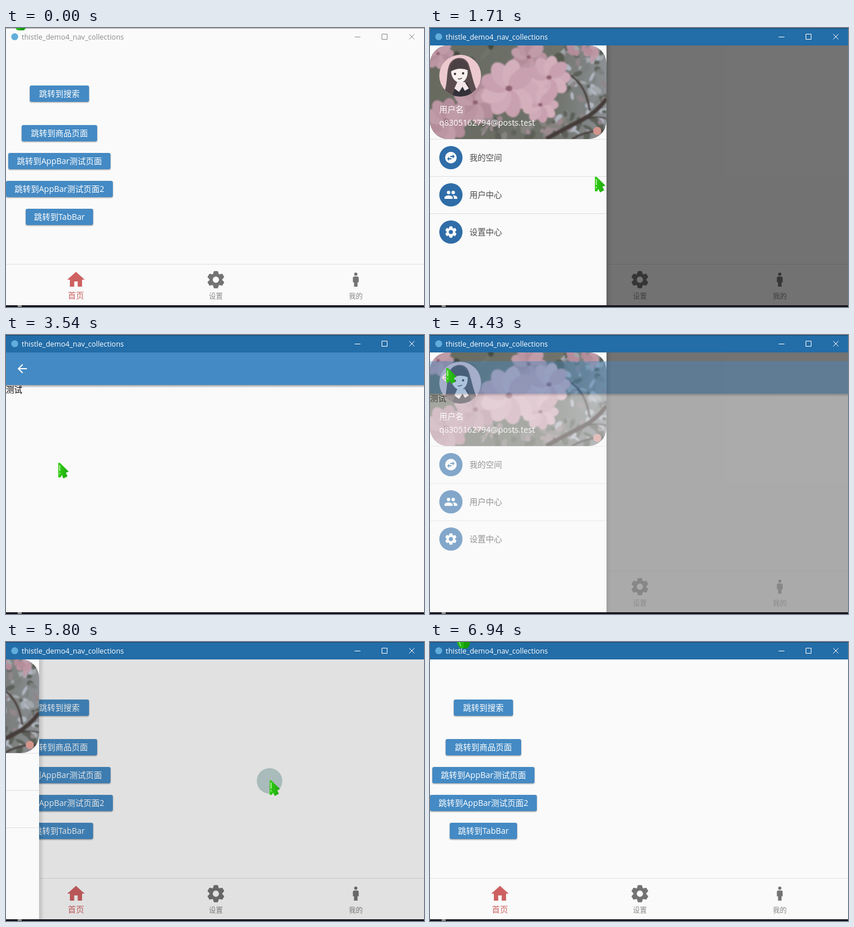
These frames come from a looping animation (720 by 480 pixels, 7110 ms). An HTML page:

```html
<!DOCTYPE html>
<html lang="zh-CN">
<head>
<meta charset="utf-8">
<title>Drawer demo</title>
<style>
  html, body { margin: 0; width: 100%; height: 100%; overflow: hidden; background: #fafafa; }
  svg { display: block; width: 720px; height: 480px; }
  text { font: 14px "Open Sans", "Noto Sans CJK SC", "Noto Sans CJK", sans-serif; }
  .button rect { fill: #448ac4; filter: drop-shadow(0 1.5px 1.2px rgba(0, 0, 0, .4)); }
  .button text { fill: #fff; text-anchor: middle; }
  .nav { fill: #737373; text-anchor: middle; }
  .nav text { font-size: 12px; font-weight: 300; fill: #868686; }
  .nav .active { fill: #cd6161; font-size: 14px; }
  .tile text { fill: #484848; font-weight: 300; }
  .tile circle { fill: #2f6da8; }
  .header text { fill: #fff; }
  .soft { filter: blur(1.2px); }
  #bar { fill: #236da8; }
  #chrome { --ink: #fff; }
  #chrome.idle { --ink: #8c8c8c; }
  #chrome.idle #bar { fill: #fafafa; }
  #chrome text { fill: var(--ink); font-size: 12.5px; }
  #controls { fill: none; stroke: var(--ink); }
</style>
</head>
<body>
<svg viewBox="0 0 720 480">
  <defs>
    <clipPath id="photoClip"><rect y="30" width="304" height="161" rx="31"/></clipPath>
    <clipPath id="avatarClip"><circle cx="52" cy="82" r="36"/></clipPath>
    <linearGradient id="edge"><stop stop-opacity=".15"/><stop offset="1" stop-opacity="0"/></linearGradient>
    <linearGradient id="under" x2="0" y2="1"><stop stop-opacity=".35"/><stop offset="1" stop-opacity="0"/></linearGradient>
    <linearGradient id="sky"><stop stop-color="#686a5f"/><stop offset=".7" stop-color="#6f726b"/><stop offset="1" stop-color="#8c9094"/></linearGradient>
    <linearGradient id="lime"><stop stop-color="#35cf16"/><stop offset="1" stop-color="#1ba60d"/></linearGradient>
    <path id="home" d="M10 20v-6h4v6h5v-8h3L12 3 2 12h3v8z"/>
    <path id="gear" fill-rule="evenodd"/>
    <g id="people">
      <circle cx="8" cy="8" r="3"/><circle cx="16" cy="8" r="3"/>
      <path d="M1 19v-2.5C1 14.2 5.7 13 8 13s7 1.2 7 3.5V19zM15 13c4 0 8 1.2 8 3.5V19h-6v-2.5c0-1.5-.8-2.6-2-3.5z"/>
    </g>
    <path id="swap" fill-rule="evenodd" d="M2 12a10 10 0 1 0 20 0a10 10 0 1 0-20 0M15 6.5l3.5 3.5-3.5 3.5V11h-4V9h4zM9 17.5L5.5 14 9 10.5V13h4v2H9z"/>
  </defs>

  <rect width="720" height="480" fill="#fafafa"/>
  <g id="buttons"></g>
  <path d="M0 406.5H720" stroke="#e2e2e2"/>
  <g class="nav">
    <g class="active"><use href="#home" transform="translate(102.5 415) scale(1.5)"/></g>
    <text class="active" x="120.5" y="465">首页</text>
    <use href="#gear" transform="translate(343.5 415) scale(1.5)"/>
    <text x="361.5" y="466">设置</text>
    <circle cx="602.5" cy="423.5" r="2.8"/>
    <path d="M600 427.5h5q2.5 0 2.5 2.5v7.5h-2v7.5h-6v-7.5h-2v-7.5q0-2.5 2.5-2.5z"/>
    <text x="602.5" y="466">我的</text>
  </g>

  <rect id="scrim" width="720" height="480"/>
  <g id="drawer">
    <rect x="304" y="30" width="9" height="447" fill="url(#edge)"/>
    <rect y="30" width="304" height="447" fill="#fafafa"/>
    <g class="header">
      <g clip-path="url(#photoClip)">
        <rect y="30" width="304" height="161" fill="url(#sky)"/>
        <g id="photo" class="soft"></g>
      </g>
      <circle cx="288" cy="177" r="7" fill="#d3948c"/>
      <g clip-path="url(#avatarClip)">
        <rect x="16" y="46" width="72" height="72" fill="#ecc9cf"/>
        <path d="M22 118C31 98 28 80 32 67C36 49 59 46 66 61C72 76 74 98 86 118z" fill="#5a4c4e"/>
        <path d="M36 70Q49 62 64 68Q68 88 53 95Q36 92 36 70z" fill="#f7eeee"/>
        <path d="M34 76Q35 55 50 54Q66 55 66 73Q50 66 34 76z" fill="#4b4145"/>
        <path d="M48 87q3 2 7-1" stroke="#3a3034" stroke-width="1.2" fill="none"/>
        <circle cx="43" cy="79" r="2" fill="#3a3034"/><circle cx="57" cy="78" r="2" fill="#3a3034"/>
        <path d="M38 118l8-23 9 3 9-4 10 24z" fill="#343038"/>
        <path d="M47 93h13l7 11-7 4-4-7-6 9-8-6z" fill="#f2e6e9"/>
      </g>
      <text x="16" y="145">用户名</text>
      <text x="16" y="168">q8305162794@posts.test</text>
    </g>
    <g id="tiles"></g>
  </g>

  <g id="page">
    <rect y="30" width="720" height="450" fill="#fafafa"/>
    <rect y="86" width="720" height="5" fill="url(#under)"/>
    <rect y="30" width="720" height="56" fill="#448ac4"/>
    <path d="M36 57H23.8l5.6-5.6L28 50l-8 8 8 8 1.4-1.4L23.8 59H36z" fill="#fff"/>
    <text y="99">测试</text>
  </g>

  <g id="chrome">
    <rect id="bar" width="720" height="30"/>
    <path d="M0 .5H720" stroke="#000" stroke-opacity=".35"/>
    <circle cx="15" cy="15" r="6" fill="#62addc"/>
    <text x="27" y="20">thistle_demo4_nav_collections</text>
    <path id="controls" d="M600.5 15.5h10M647.5 10.5h9v9h-9zM694.5 10.5l9 9M703.5 10.5l-9 9"/>
    <rect y="477" width="720" height="3" fill="#15131c"/>
    <rect x="20" y="477" width="7" height="3" fill="#8b8b8b"/>
  </g>

  <circle id="tap"/>
  <g id="cursor">
    <g id="arrow">
      <path d="M0 0H3L18 15 13 17 16 23 9 27 6 21 4 25H0z" fill="url(#lime)"/>
      <path d="M2.5 4v10M2.5 17v2" stroke="#d8f8cc" stroke-width="1.4"/>
    </g>
    <g id="leaf">
      <path d="M22 5C14 8 10 13 8 26H18C24 20 24 12 22 5z" fill="#149c0a"/>
      <path d="M4 0C-2 7-1 21 7 26H11C15 18 11 7 4 0z" fill="#25b414"/>
      <path d="M4 5Q3 14 7 22" stroke="#b6efa2" stroke-width="1.2" fill="none"/>
    </g>
  </g>
</svg>

<script>
const LOOP = 7110;
const $ = id => document.getElementById(id);
const clamp = v => Math.min(1, Math.max(0, v));

function bezier(x1, y1, x2, y2) {
  const at = (a, b, u) => 3 * a * u * (1 - u) ** 2 + 3 * b * u * u * (1 - u) + u ** 3;
  return x => {
    let lo = 0, hi = 1;
    for (let i = 0; i < 24; i++) {
      const mid = (lo + hi) / 2;
      if (at(x1, x2, mid) < x) lo = mid; else hi = mid;
    }
    return at(y1, y2, hi);
  };
}
const easeIn = bezier(.42, 0, 1, 1);
const fastOutSlowIn = bezier(.4, 0, .2, 1);

function gearPath() {
  const point = (deg, r) => {
    const a = deg * Math.PI / 180;
    return `${(12 + r * Math.sin(a)).toFixed(2)} ${(12 - r * Math.cos(a)).toFixed(2)}`;
  };
  const corners = [];
  for (let a = 0; a < 360; a += 60)
    corners.push(point(a - 27, 7.3), point(a - 13, 10.1), point(a + 13, 10.1), point(a + 27, 7.3));
  return `M${corners.join('L')}zM8.4 12a3.6 3.6 0 1 0 7.2 0a3.6 3.6 0 1 0-7.2 0`;
}

function blossomPhoto() {
  let seed = 7;
  const rand = () => (seed = seed * 16807 % 2147483647) / 2147483647;
  const blob = (x, y, rx, ry, fill, turn = 0) =>
    `<ellipse cx="${x}" cy="${y}" rx="${rx}" ry="${ry}" fill="${fill}" transform="rotate(${turn} ${x} ${y})"/>`;
  const pick = list => list[Math.floor(rand() * list.length)];
  const scatter = (count, x, y, w, h, size, colors) => Array.from({ length: count }, () =>
    blob(x + rand() * w, y + rand() * h, size * (.4 + rand()), size * (.3 + rand() * .5),
      pick(colors), rand() * 180)).join('');
  const branch = (d, width) => `<path d="${d}" fill="none" stroke="#453c3a" stroke-width="${width}"/>`;
  const flower = (x, y, r, colors) => {
    let out = '';
    for (let i = 0; i < 9; i++) {
      const a = i * 40, rad = a * Math.PI / 180;
      out += blob(x + r * .55 * Math.cos(rad), y + r * .55 * Math.sin(rad), r * .5, r * .32, colors[i % 3], a);
    }
    return out + blob(x, y, r * .12, r * .1, '#8f6070');
  };
  const light = ['#cfa9b7', '#d4b0bd', '#c8a0af'];
  const dusky = ['#bb95a2', '#b48d9a', '#c09ca8'];
  return scatter(90, 215, 32, 90, 160, 7, ['#a3a8ad', '#7c817f', '#8f858a', '#5c6059', '#b0b6c0'])
    + scatter(30, 0, 30, 225, 90, 14, ['#454b40', '#575c50', '#70736a'])
    + scatter(30, 90, 155, 150, 36, 9, ['#5d6057', '#85827f', '#9c8a90'])
    + branch('M200 191Q238 170 262 158T304 122', 7) + branch('M222 72Q268 86 275 142', 3)
    + branch('M245 191Q272 174 304 178', 3) + branch('M262 158Q290 150 304 156', 2)
    + scatter(18, 238, 30, 50, 20, 9, dusky)
    + [[14, 44, 26], [78, 128, 36], [28, 160, 38], [170, 50, 30]].map(f => flower(...f, dusky)).join('')
    + [[205, 85, 36], [190, 132, 30], [136, 104, 48]].map(f => flower(...f, light)).join('');
}

$('gear').setAttribute('d', gearPath());
$('photo').innerHTML = blossomPhoto();
$('buttons').innerHTML = [
  ['跳转到搜索', 113, 102], ['跳转到商品页面', 181, 130], ['跳转到AppBar测试页面', 229, 176],
  ['跳转到AppBar测试页面2', 277, 184], ['跳转到TabBar', 325, 116]
].map(([label, y, w]) => `<g class="button"><rect x="${92 - w / 2}" y="${y - 14}" width="${w}" height="28" rx="3"/>
  <text x="92" y="${y + 5}">${label}</text></g>`).join('');
$('tiles').innerHTML = [['swap', '我的空间'], ['people', '用户中心'], ['gear', '设置中心']]
  .map(([icon, label], i) => `<g class="tile" transform="translate(0 ${191 + 64 * i})">
    <path d="M0 .5H304" stroke="#e0e0e0"/><circle cx="36" cy="32" r="20"/>
    <use href="#${icon}" x="24" y="20" fill="#fafafa"/><text x="68" y="37">${label}</text></g>`).join('');

// Pointer stops: time, x, y, hand shape. The picture only refreshes at these times.
const stops = [
  [0, 13, -22, 1], [160, 26, 8], [350, 18, 40], [540, 8, 68], [720, 4, 79], [910, 133, 85],
  [1130, 232, 128], [1320, 296, 185], [1510, 294, 232], [1710, 284, 256], [1930, 240, 272, 1],
  [2150, 172, 288, 1], [2340, 122, 294, 1], [2560, 108, 294, 1], [2760, 108, 294, 1],
  [2960, 112, 298], [3150, 112, 298], [3350, 108, 280], [3540, 90, 220], [3730, 62, 140],
  [3900, 40, 82], [4080, 28, 58], [4260, 28, 57], [4430, 28, 57], [4600, 30, 60],
  [4820, 170, 118], [5020, 370, 214], [5220, 454, 238], [5800, 454, 238], [6000, 452, 232],
  [6200, 390, 168], [6390, 290, 86], [6580, 200, 20], [6770, 150, -8, 1], [6940, 46, -15, 1]
];
// Time, x, y, radius, colour.
const taps = [
  [910, 54, 79, 14.5, 'rgba(60,150,110,.6)'],
  [2760, 112, 298, 23, 'rgba(40,130,130,.4)'],
  [4260, 28, 57, 20, 'rgba(40,100,100,.3)'],
  [5800, 454, 239, 22, 'rgba(40,100,100,.3)']
];

function drawerWidth(t) {
  if (t < 910 || t >= 6000) return 0;
  if (t < 1130) return 56;
  if (t < 1320) return 190;
  return t < 5800 ? 304 : 57;
}

function draw(t) {
  const width = drawerWidth(t);
  $('drawer').setAttribute('transform', `translate(${width ? width - 304 : -330} 0)`);
  $('scrim').setAttribute('fill-opacity', .54 * width / 304);

  const route = clamp(t < 4300 ? (t - 2630) / 300 : 1 - (t - 4307) / 300);
  $('page').setAttribute('opacity', easeIn(route));
  $('page').setAttribute('transform', `translate(0 ${Math.round(112 * (1 - fastOutSlowIn(route)))})`);
  $('page').style.display = route > .03 ? '' : 'none';

  $('chrome').classList.toggle('idle', t < 720);

  const [, x, y, hand] = stops.find(s => s[0] === t);
  $('cursor').setAttribute('transform', `translate(${x} ${y})`);
  $('arrow').style.display = hand ? 'none' : '';
  $('leaf').style.display = hand ? '' : 'none';

  const [, cx, cy, r, fill] = taps.find(p => p[0] === t) || [0, 0, 0, 0, 'none'];
  Object.entries({ cx, cy, r, fill }).forEach(([key, value]) => $('tap').setAttribute(key, value));
}

const start = performance.now();
let shown = -1;
function tick() {
  const now = (performance.now() - start) % LOOP;
  const time = stops.findLast(s => s[0] <= now)[0];
  if (time !== shown) draw(shown = time);
  requestAnimationFrame(tick);
}
tick();
</script>
</body>
</html>
```
